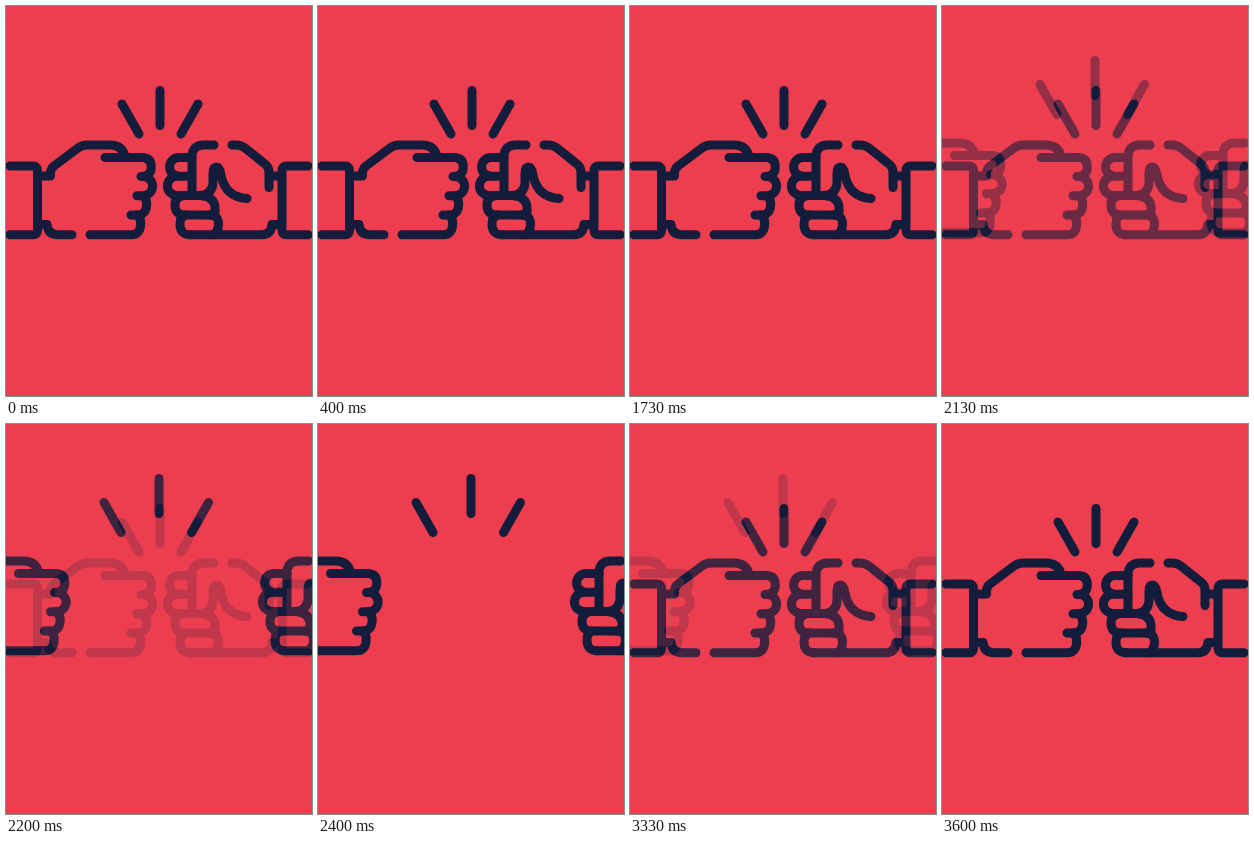
Animation of 306 by 390 pixels, one loop 3990 ms. Source, as an HTML page:

```html
<!DOCTYPE html>
<html lang="en">
<head>
<meta charset="utf-8">
<title>Fist bump</title>
<style>
  html, body { margin: 0; height: 100%; overflow: hidden; background: #ed3e50; }
  svg { display: block; width: 100vw; height: 100vh; }
  path { fill: none; stroke: #131d3b; stroke-width: 9; stroke-linecap: round; stroke-linejoin: round; }
</style>
</head>
<body>
<svg viewBox="0 0 306 390">
  <defs>
    <g id="left">
      <path d="M4 160H27Q31.5 160 31.5 164.5V224Q31.5 228.7 27 228.7H4"/>
      <path d="M36 170H44.5V167Q44.5 163 48 160L72 142Q76 139 81 139H104Q116 139 119 150"/>
      <path d="M36 218.5H41Q42 228.7 52 228.7H66"/>
      <path d="M99 151.5H137Q145.3 152 145.3 161Q145.3 170.5 135 170.5"/>
      <path d="M137 170.5A9.6 9.6 0 0 1 137 189.7H131"/>
      <path d="M137 189.7Q140.7 193 140.7 198Q140.7 209 131 209H125"/>
      <path d="M131 209Q134.7 212 134.7 217Q134.7 228.7 125 228.7H84"/>
    </g>
    <g id="right">
      <path d="M302 160H280.5Q276 160 276 164.5V224Q276 228.7 280.5 228.7H302"/>
      <path d="M226 139H230Q235 139 239 142L259 158Q263 161 263 166V181.5M263 170H272"/>
      <path d="M272 218.5H266Q265 228.7 256 228.7H183"/>
      <path d="M208 139H198Q186 139 186 151V189"/>
      <path d="M186 151.5H173A9.4 9.4 0 0 0 173 170.3H186"/>
      <path d="M171 170.3A9.6 9.6 0 0 0 171 189.5H196Q207 187 207 176V167Q207 161 210.5 161Q214 161 215 169Q219 191 241 192.5"/>
      <path d="M177 189.7Q169 191 169 199Q169 209 179 209H205M196 189.7Q208 191 209 201V209"/>
      <path d="M179 209Q174 211 174 218Q174 228.7 184 228.7M203 209Q212.5 209 212.5 218Q212.5 226 207 228.7"/>
    </g>
    <path id="rayLeft" d="M116 98L133 128"/>
    <path id="rayMid" d="M154 84.5V119.5"/>
    <path id="rayRight" d="M192 98L175 128"/>
  </defs>
  <g id="together"></g>
  <g id="apart"></g>
</svg>
<script>
  const LOOP = 3990, TICK = 1000 / 15;
  const apart = document.getElementById('apart');

  // Each pose is opaque, so fading the top one gives an even cross-fade.
  function drawPose(id, offsets) {
    const parts = Object.entries(offsets).map(([part, [x, y]]) =>
      `<use href="#${part}" x="${x}" y="${y}"/>`);
    document.getElementById(id).innerHTML =
      '<rect width="306" height="390" fill="#ed3e50"/>' + parts.join('');
  }

  const rest = [0, 0];
  drawPose('together', { left: rest, right: rest, rayLeft: rest, rayMid: rest, rayRight: rest });
  drawPose('apart', {
    left: [-86.5, -2], right: [95, -2],
    rayLeft: [-18, -19.5], rayMid: [-1, -30], rayRight: [10.5, -19.5]
  });

  const fade = ticks => Math.min(1, Math.max(0, ticks * 0.4));

  function frame() {
    const tick = Math.floor((performance.now() % LOOP + 5) / TICK);
    apart.setAttribute('opacity', fade(tick - 31) - fade(tick - 48));
    requestAnimationFrame(frame);
  }
  frame();
</script>
</body>
</html>
```
